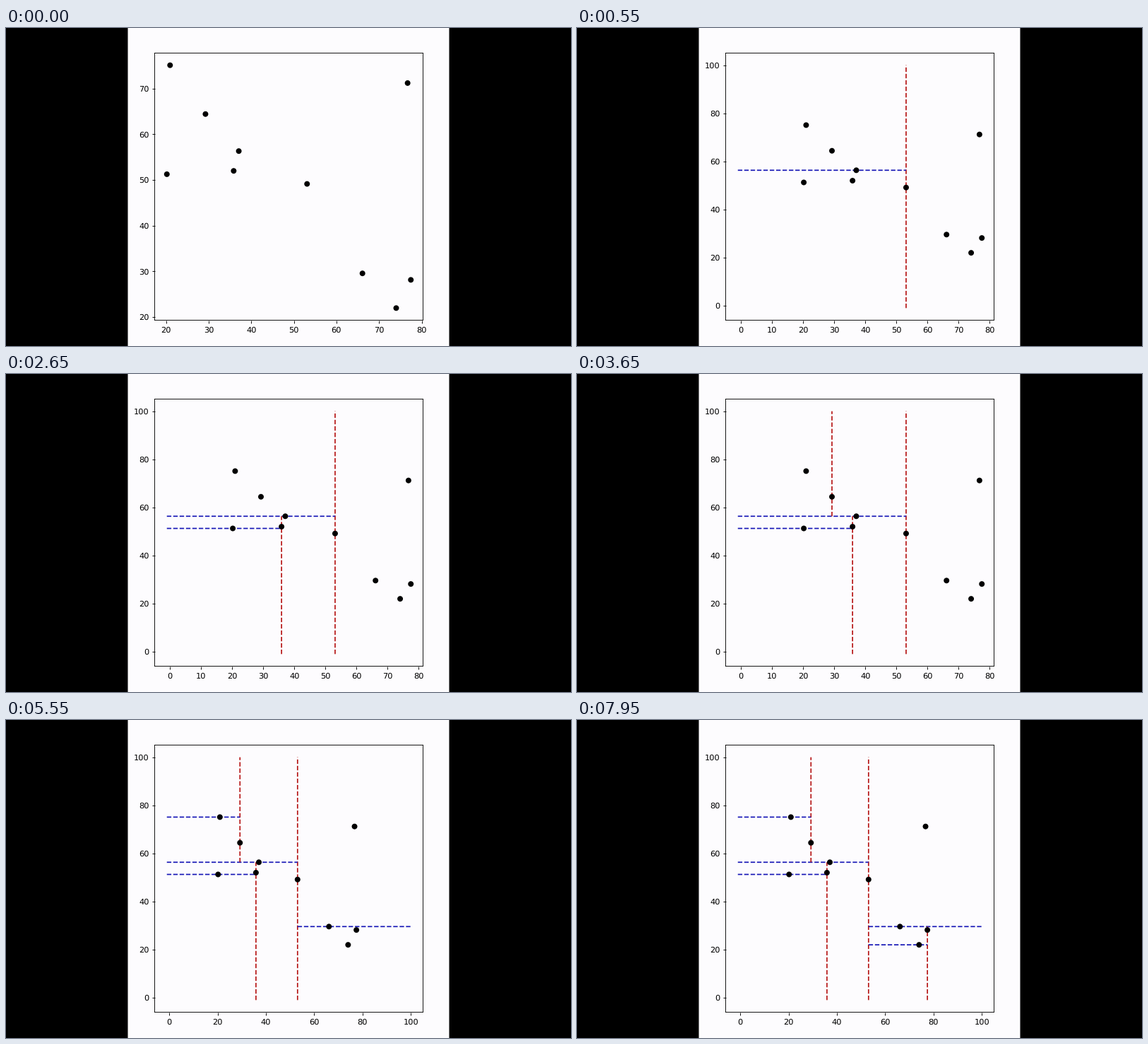
A matplotlib script that plays this animation: 800x450 px, repeating every 8 s.

```python
import matplotlib.pyplot as plt
from matplotlib.animation import FuncAnimation
from matplotlib.patches import Rectangle

WIDTH, HEIGHT, DPI = 800, 450, 100
STEP_MS, LOOP_MS = 50, 8000
PT = 0.818  # plot scale: one plot point in figure points
PAPER, RED, BLUE = "#fdfcfe", "#b61616", "#1616b6"
LOW, HIGH = -1, 100

POINTS = [(20.95, 75.1), (29.26, 64.42), (37.08, 56.32), (35.88, 51.99),
          (20.2, 51.26), (53.1, 49.14), (66.1, 29.57), (77.46, 28.15),
          (74.02, 21.98), (76.7, 71.2)]
XS, YS = zip(*POINTS)
TOP_LEFT, UPPER, SPLIT, INNER, LEFT, ROOT, RIGHT, LOWER, LAST, _ = POINTS

# Keep sub-pixel positions instead of rounding to the pixel grid
plt.rcParams.update({"font.family": "DejaVu Sans", "path.snap": False,
                     "text.hinting": "none"})
fig = plt.figure(figsize=(WIDTH / DPI, HEIGHT / DPI), dpi=DPI, facecolor="black")
fig.add_artist(Rectangle((172.5 / WIDTH, 0), 455 / WIDTH, 1, facecolor=PAPER,
                         edgecolor="none", transform=fig.transFigure, zorder=-1))
ax = fig.add_axes([210.5 / WIDTH, 1 - 413.5 / HEIGHT, 380 / WIDTH, 378 / HEIGHT],
                  facecolor=PAPER)
ax.tick_params(labelsize=10 * PT, length=3.5 * PT, width=0.8 * PT, pad=3.5 * PT)
ax.tick_params(axis="x", pad=4.2 * PT)
for spine in ax.spines.values():
    spine.set_linewidth(0.8 * PT)
# One size per dot keeps the dots off the rounded marker path
ax.scatter(XS, YS, s=[(7 * PT) ** 2] * len(POINTS), c="black", linewidths=0, zorder=3)


def vertical(point, start, end):
    return [point[0]] * 2, [start, end], RED


def horizontal(point, start, end):
    return [start, end], [point[1]] * 2, BLUE


# Time each k-d tree split appears, in ms
SPLITS = [
    (500, vertical(ROOT, LOW, HIGH)),
    (500, horizontal(SPLIT, LOW, ROOT[0])),
    (1550, vertical(INNER, LOW, SPLIT[1])),
    (2550, horizontal(LEFT, LOW, INNER[0])),
    (3650, vertical(UPPER, SPLIT[1], HIGH)),
    (4150, horizontal(TOP_LEFT, LOW, UPPER[0])),
    (5550, horizontal(RIGHT, ROOT[0], HIGH)),
    (6900, vertical(LOWER, LOW, RIGHT[1])),
    (7300, horizontal(LAST, ROOT[0], LOWER[0])),
]
lines = [(start, ax.plot(x, y, "--", color=color, lw=1.5 * PT, zorder=2)[0])
         for start, (x, y, color) in SPLITS]


def padded(low, high):
    margin = 0.05 * (high - low)
    return low - margin, high + margin


def set_view(x_range, y_range, x_ticks, y_ticks):
    ax.set_xticks(x_ticks)
    ax.set_yticks(y_ticks)
    ax.set_xlim(padded(*x_range))
    ax.set_ylim(padded(*y_range))


def update(frame):
    now = frame * STEP_MS
    if now < 500:
        set_view((min(XS), max(XS)), (min(YS), max(YS)),
                 range(20, 81, 10), range(20, 71, 10))
    elif now < 5550:
        set_view((LOW, max(XS)), (LOW, HIGH), range(0, 81, 10), range(0, 101, 20))
    else:
        set_view((LOW, HIGH), (LOW, HIGH), range(0, 101, 20), range(0, 101, 20))
    for start, line in lines:
        line.set_visible(now >= start)
    return [line for _, line in lines]


anim = FuncAnimation(fig, update, frames=LOOP_MS // STEP_MS, interval=STEP_MS,
                     repeat=True, repeat_delay=0, blit=False)
plt.show()
```
